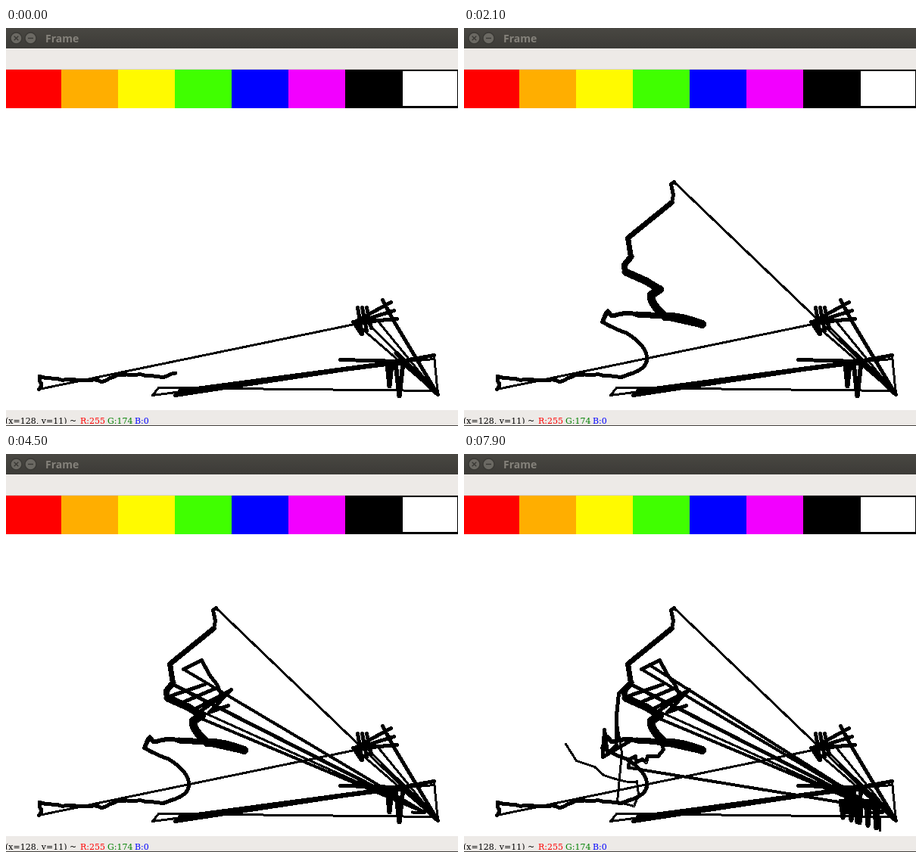
An HTML page for the animation above (8 s loop, 597x526 px).

```html
<!DOCTYPE html>
<html lang="en">
<head>
<meta charset="utf-8">
<title>Frame</title>
<style>
  html, body { margin: 0; width: 100%; height: 100%; overflow: hidden; background: #fff; }
  #stage { position: relative; width: 597px; height: 526px; overflow: hidden; }
  #stage > * { position: absolute; }
  #board { left: 0; top: 0; fill: none; stroke: #000; stroke-linecap: round; stroke-linejoin: round; shape-rendering: crispEdges; }
  .title { left: 0; top: 0; width: 597px; height: 27px; background: linear-gradient(#494742, #3c3b37); }
  .title b { position: absolute; left: 52px; top: 4px; font: 700 14px/19px "Open Sans", sans-serif; color: #85827b; }
  .title svg { position: absolute; left: 0; top: 0; }
  .tools { left: 0; top: 27px; width: 597px; height: 28px; background: #edeae7; box-shadow: inset 0 -1px #d8d4d0; }
  .swatches { left: -2px; top: 55px; width: 599px; height: 51px; display: flex; }
  .swatches i { box-sizing: border-box; flex: 0 0 75px; }
  .swatches i:last-child { flex-basis: 74px; border: solid #000; border-width: 2px 1px 3px; }
  .status { left: 0; top: 505px; width: 597px; height: 20px; background: #edeae7; border-bottom: 1px solid #45433f; }
  .status p { position: absolute; left: -1px; top: 0; width: 300px; height: 18px; margin: 0; overflow: hidden; }
  .status span { position: absolute; top: 8px; font: 11px/13px "DejaVu Serif", serif; white-space: pre; }
</style>
</head>
<body>
<div id="stage">
  <svg id="board" width="597" height="526"><g transform="translate(.5 .5)"></g></svg>
  <div class="title">
    <svg width="46" height="27" fill="#6b6963" stroke="#3a3935" stroke-width="1.4">
      <circle cx="13.5" cy="13.5" r="7.5"/><path d="M10.7 10.7l5.6 5.6m0-5.6l-5.6 5.6"/>
      <circle cx="32.5" cy="13.5" r="7.5"/><path d="M29 13.5h7"/>
    </svg>
    <b>Frame</b>
  </div>
  <div class="tools"></div>
  <div class="swatches"></div>
  <div class="status"><p>
    <span style="left:0">(x=128, y=11) ~</span>
    <span style="left:99px;color:#f00">R:255</span>
    <span style="left:135px;color:#008000">G:174</span>
    <span style="left:171px;color:#00f">B:0</span>
  </p></div>
</div>
<script>
const LOOP = 8000, STEP = 100;
const board = document.querySelector('#board g');
const strokes = [];

for (const color of ['#f00', '#ffae00', '#fffa00', '#40ff00', '#00f', '#f200ff', '#000', '#fff']) {
  const el = document.createElement('i');
  el.style.background = color;
  document.querySelector('.swatches').append(el);
}

let seed = 7;
const random = () => (seed = seed * 16807 % 2147483647) / 2147483647;

// Resample a path every few pixels, with a little hand tremor.
function roughen(path, size) {
  const length = path.getTotalLength(), count = Math.ceil(length / 6);
  const points = Array.from({ length: count + 1 }, (_, i) => {
    const { x, y } = path.getPointAtLength(length * i / count);
    return [x + (random() - .5) * size, y + (random() - .5) * size];
  });
  path.setAttribute('d', 'M' + points.join('L'));
}

// Draw a path between two steps of the loop.
function stroke(from, to, width, d, tremor = 0) {
  const path = document.createElementNS('http://www.w3.org/2000/svg', 'path');
  path.setAttribute('d', d);
  path.setAttribute('stroke-width', width);
  board.append(path);
  if (tremor) roughen(path, tremor);
  path.setAttribute('pathLength', 1);
  strokes.push({ path, from, to });
}
const still = (width, d, tremor) => stroke(0, 0, width, d, tremor);
const flash = (at, width, d) => stroke(at, at, width, d);
const repeat = (n, fn) => { for (let i = 0; i < n; i++) fn(i); };
const ray = (at, width, x, y) => flash(at, width, `M${x},${y} L552,473`);

function spike(from, x, top, bottom, half) {
  stroke(from, from + STEP, 6, `M${x - half},${top} L${x},${bottom} ${x + half},${top} Z`);
}

// On the board from the beginning
still(5, 'M224,455 L207,461 Q170,456 145,458 L127,468 118,464 Q85,467 47,461 L43,460 V469 H48 L43,477', 1.5);
still(3, 'M43,477 L460,391 516,384');
repeat(3, i => {
  still(5, `M${460 + 4 * i},388 L${508 + 4 * i},${362 + 11 * i}`);
  still(5, `M${464 + 6 * i},369 L${470 + 6 * i},${404 - 4 * i}`);
  still(3, `M${464 + 13 * i},${392 - 3 * i} L570,484`);
});
still(5, 'M458,388 L469,404');
still(5, 'M497,359 L510,384 570,484');
still(6, 'M515,429 L568,482');
repeat(2, i => still(5, `M${223 + 6 * i},${485 - 6 * i} L520,440`));
still(5, 'M441,438 L520,440 565,432');
still(3, 'M520,441 L565,437 M565,432 L570,485');
still(3, 'M525,442 L193,485 201,475 570,479');
spike(-STEP, 506, 444, 473, 3);
spike(-STEP, 519, 442, 486, 5);

// Outline of the head
stroke(100, 900, 5, 'M224,455 L207,461 M224,455 C250,445 246,423 215,403 Q200,398 182,388', 0);
stroke(1000, 1100, 6, 'M182,388 L189,373 194,380 Q210,376 228,378', 1.5);
flash(1200, 8, 'M228,378 L264,380');
flash(1300, 10, 'M264,380 L314,391');
stroke(1400, 1600, 11, 'M314,391 Q285,380 265,381 Q244,362 247,352 L258,345');
flash(1700, 10, 'M258,345 L240,334 213,322');
flash(1800, 8, 'M213,322 L211,313 220,302');
flash(1900, 7, 'M220,302 L216,277 274,230');
flash(2000, 5, 'M274,230 L276,220 273,206 277,203');
flash(2100, 3, 'M277,203 L570,484');

// Jumps back to the lower right corner, and the hatching between them
ray(2200, 4, 257, 349);
ray(2300, 3, 258, 340);
ray(2400, 5, 220, 304);
flash(2600, 5, 'M257,339 L297,311 268,341 293,332');
stroke(2900, 3500, 4, 'M550,474 L536,473');
ray(3700, 4, 275, 332);
repeat(3, i => flash(3800 + 200 * i, 5, `M${218 + 17 * i},${319 + 8 * i} l44,${-15 - 4 * i}`));
stroke(4300, 4400, 5, 'M285,320 L278,304 268,291 258,272 234,284');
ray(4500, 4, 234, 284);
ray(4600, 4, 244, 278);
flash(4900, 4, 'M545,468 L547,494');
flash(5100, 3, 'M549,479 V497');
repeat(5, i => spike(5300 + 200 * i, 544 - 11 * i, 458, 494 - 3.5 * i, 3));

// Neck, ear and last thin line
flash(6200, 4, 'M498,460 L217,414');
stroke(6300, 6600, 5, 'M217,414 L218,403 226,399 227,407 235,403 240,407 242,399 256,399 263,390 260,380');
stroke(6700, 6800, 5, 'M260,382 L220,378 183,400');
flash(6900, 5, 'M183,400 L185,364 189,396 201,384');
flash(7000, 5, 'M201,380 V345 L204,316 214,306');
stroke(7100, 7900, 3, 'M204,319 L201,350 208,395 202,459 224,465 230,450 228,432 Q222,437 184,424 L172,413 148,405 134,383');

function draw(time) {
  const now = Math.floor(time / STEP) * STEP;
  for (const { path, from, to } of strokes) {
    const part = Math.min(1, (now - from + STEP) / (to - from + STEP));
    path.style.visibility = now >= from ? 'visible' : 'hidden';
    path.style.strokeDasharray = part < 1 ? `${part} 2` : 'none';
  }
}

const start = performance.now();
function tick() {
  draw((performance.now() - start) % LOOP);
  requestAnimationFrame(tick);
}
tick();
</script>
</body>
</html>
```
